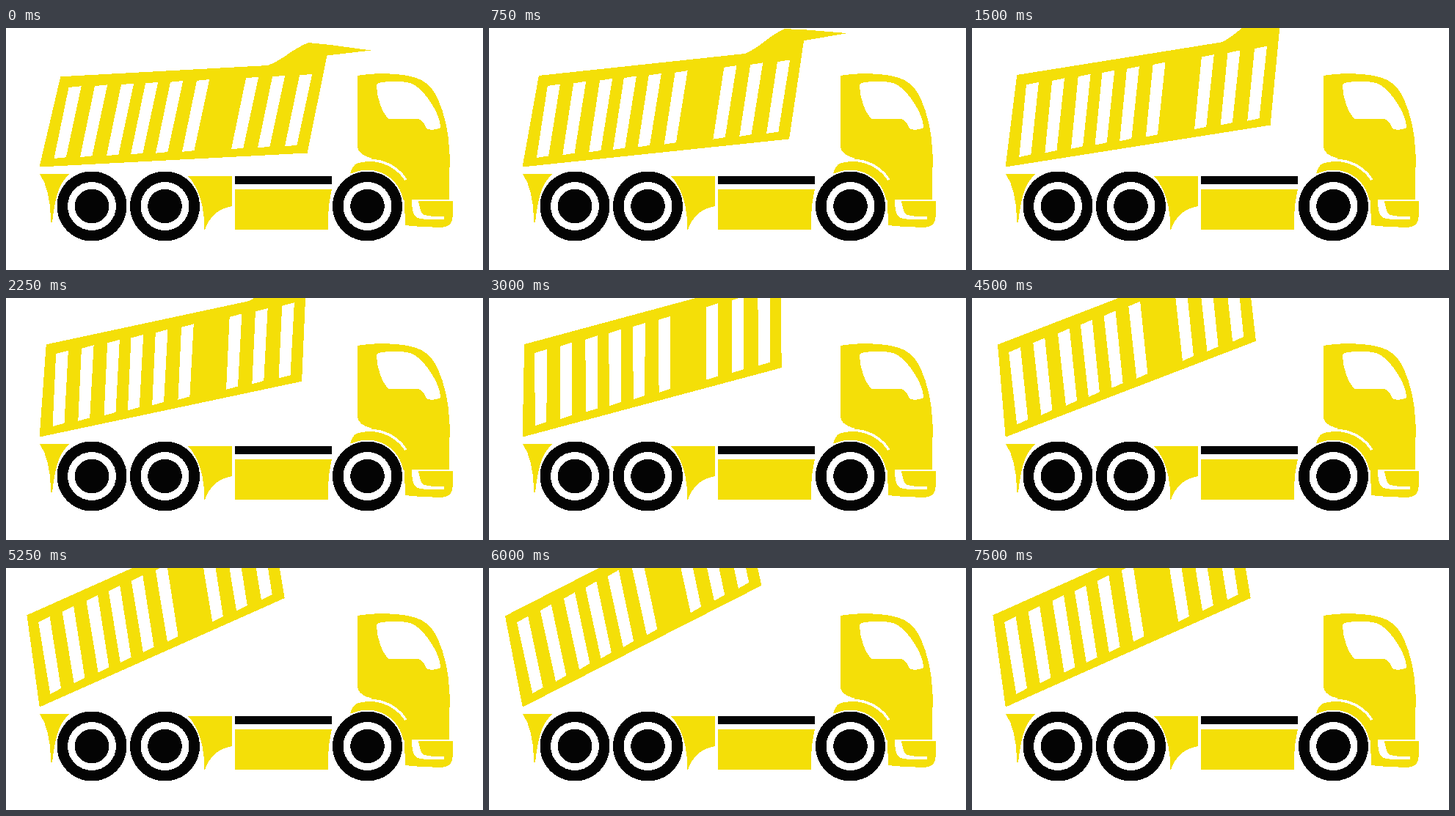
Write an HTML page that moves like this. It is 650 px wide and 330 px high and loops after 8 s.

```html
<!DOCTYPE html>
<html lang="en">
<head>
<meta charset="utf-8">
<title>Tipper truck</title>
<style>
  html, body { margin: 0; width: 100%; height: 100%; overflow: hidden; background: #fff; }
  svg { display: block; width: 650px; height: 330px; fill: #f4df08; shape-rendering: crispEdges; }
  .white { fill: #fff; }
  .black { fill: #040404; }
  .line { fill: none; stroke: #fff; stroke-width: 3.5; }
</style>
</head>
<body>
<svg viewBox="0 0 650 330">
  <defs>
    <g id="wheel">
      <circle class="black" r="47.5"/>
      <circle class="white" r="33"/>
      <circle class="black" r="23.3"/>
    </g>
  </defs>

  <!-- cab -->
  <path d="M479 65C500 61 545 60 566 71C578 77 584 87 589 98C597 116 603 140 604 165L605.5 186L604 192V235H609V255C609 267 603 272 592 272L560 270.5L544 269L543 235L500 205L469 198C472 187 478 183 487 181L500 178C489 176 479 170 479 162Z"/>
  <path class="white" d="M508 75C520 72 545 72 553 76C565 81 577 97 585 112C590 122 592 130 592 136C586 139 578 140 573 137C570 130 567 125 562 124H522C515 120 506 100 505 80Q505 76 508 75Z"/>
  <circle class="white" cx="492.5" cy="243" r="49.5"/>
  <path class="line" d="M476 183.5C488 179.5 503 179.5 515 183.5C528 188 537 195 545 207"/>
  <path class="white" d="M553 234H609V236H562Q564 248 567 253Q570 257 597 257.5V260.5H570C556 261 553 253 553 234Z"/>

  <!-- chassis -->
  <path d="M46 199H87C71 212 67 232 63 265H61C61 240 57 215 46 199Z"/>
  <path d="M248 202H308V243C289 246 277 258 271 275H270C271 244 263 218 248 202Z"/>
  <path class="black" d="M312 202H444V213H312Z"/>
  <path d="M312 220H444Q438 245 439 275H312Z"/>
  <use href="#wheel" x="117" y="243"/>
  <use href="#wheel" x="216.5" y="243"/>
  <use href="#wheel" x="492.5" y="243"/>

  <g id="bed">
    <path d="M74.3 66.3L357 51Q372 45 388 33Q402 24 412 20L442 23L497 30.5L437.5 37.5L410.5 170.5L45.5 189.5Z"/>
    <path id="slots" class="white"/>
  </g>
</svg>
<script>
  const STEP = 750, LOOP = 8000, TILT = 3;
  const bed = document.getElementById("bed");

  document.getElementById("slots").setAttribute("d",
    [85.5, 121, 157, 190, 224, 260, 327, 363, 400]
      .map(x => `M${x} ${81 - (x - 85) * 0.0525}l17.2 -1.7l-20.8 97l-16.4 1.7z`).join(""));

  // The bed rises in hard steps, rests at the top, then starts back down.
  function draw(now) {
    const step = Math.floor(now % LOOP / STEP);
    const lift = step < 10 ? Math.min(step, 8) : 7;
    bed.setAttribute("transform", `rotate(${-TILT * lift} 46 189)`);
    requestAnimationFrame(draw);
  }
  draw(performance.now());
</script>
</body>
</html>
```
